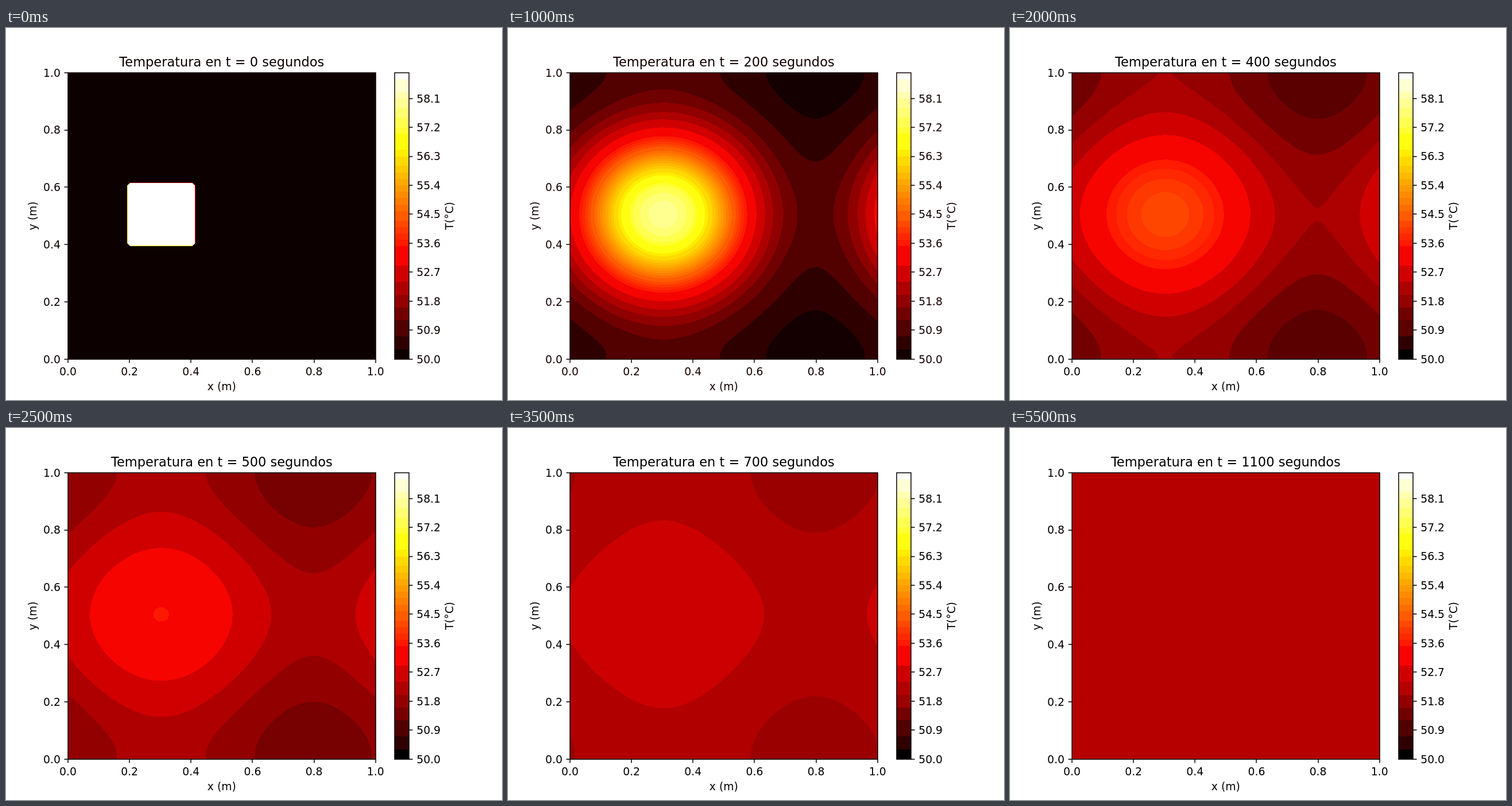
An HTML page with a canvas that plays this animation: 864x648 px, repeating every 6 s.

```html
<!DOCTYPE html>
<html lang="es">
<head>
<meta charset="utf-8">
<title>Temperatura</title>
<style>
html, body { margin: 0; width: 100%; height: 100%; overflow: hidden; background: #fff; }
canvas { display: block; }
</style>
</head>
<body>
<canvas id="stage" width="864" height="648"></canvas>
<script>
const ctx = document.getElementById("stage").getContext("2d");
const FONT = '"DejaVu Sans", Verdana, sans-serif';
const AX = { x: 108, y: 77.76, w: 535.68, h: 498.96 };
const BOTTOM = AX.y + AX.h;
const X0 = 108, X1 = 644, Y0 = 78, Y1 = 577, BAR0 = 677, BAR1 = 702;
const GRID = 99, PERIOD = 98, WIDTH = 21, BANDS = 89;
const MEAN = 2.29; // final rise above 50 degrees
const clamp = v => Math.max(0, Math.min(1, v));

// "hot" colour map, one colour per 0.1 degree, grouped into a coarse palette
const bands = Array.from({ length: BANDS }, (_, k) => {
  const v = Math.floor(256 * (k + 0.5) / BANDS) / 255;
  const rgb = [
    0.0416 + 0.9584 * clamp(v / 0.365079),
    clamp((v - 0.365079) / 0.380953),
    clamp((v - 0.746032) / 0.253968)
  ].map(c => Math.round(255 * c));
  const bin = (c, shift, offset) => Math.max(0, c - offset) >> shift;
  const key = bin(rgb[0], 5, 2) + "," + bin(rgb[1], 4, 2) + "," + bin(rgb[2], 5, 4);
  return { rgb, key };
});

// Each group takes the mean colour of the pixels that use it
function makePalette(counts) {
  const groups = {};
  const add = (key, rgb, n) => {
    const g = groups[key] ||= { n: 0, sum: [0, 0, 0] };
    g.n += n;
    rgb.forEach((c, i) => g.sum[i] += c * n);
  };
  bands.forEach((b, k) => add(b.key, b.rgb, counts[k] + 140));
  add(bands[0].key, [0, 0, 0], 5000);
  add(bands[BANDS - 1].key, [255, 255, 255], 250000);
  return bands.map(b => groups[b.key].sum.map(c => Math.round(c / groups[b.key].n)));
}

// Heat spread along one axis of a periodic plate, around grid point mid
function profile(g, mid, t) {
  if (!t) return clamp(WIDTH / 2 + 0.5 - Math.abs(g - mid));
  let u = 1;
  for (let n = 1; n < 10; n++) {
    const a = Math.PI * n / PERIOD;
    const amp = Math.sin(WIDTH * a) / (WIDTH * Math.sin(a));
    const rate = 2 - 2 * Math.cos(2 * a);
    u += 2 * amp * Math.exp(-rate * t) * Math.cos(2 * a * (g - mid));
  }
  return u;
}

function paintField(t) {
  const w = X1 - X0, h = Y1 - Y0;
  const ux = Array.from({ length: w }, (_, i) =>
    profile((X0 + i + 0.5 - AX.x) / AX.w * GRID, 30, t));
  const uy = Array.from({ length: h }, (_, j) =>
    profile((BOTTOM - Y0 - j - 0.5) / AX.h * GRID, 50, t));
  const counts = new Array(BANDS).fill(0);
  const cells = new Int16Array(w * h);
  for (let j = 0, p = 0; j < h; j++) {
    for (let i = 0; i < w; i++, p++) {
      const rise = t ? MEAN * ux[i] * uy[j] : 50 * Math.max(0, ux[i] + uy[j] - 1);
      const k = Math.max(0, Math.floor(rise * 10));
      cells[p] = k;
      if (k < BANDS) counts[k]++;
    }
  }
  const palette = makePalette(counts);
  const img = ctx.createImageData(w, h);
  cells.forEach((k, p) => {
    const c = palette[k] || [255, 255, 255];
    img.data.set([c[0], c[1], c[2], 255], p * 4);
  });
  ctx.putImageData(img, X0, Y0);
  return palette;
}

function paintBar(palette) {
  for (let y = Y0; y < Y1; y++) {
    const k = Math.floor((BOTTOM - y - 0.5) / AX.h * BANDS);
    ctx.fillStyle = `rgb(${palette[Math.max(0, Math.min(BANDS - 1, k))]})`;
    ctx.fillRect(BAR0, y, BAR1 - BAR0, 1);
  }
}

function text(str, x, y, align = "center", size = 18.75) {
  ctx.font = size + "px " + FONT;
  ctx.textAlign = align;
  ctx.fillText(str, x, y);
}

function upright(str, x, y) {
  ctx.save();
  ctx.translate(x, y);
  ctx.rotate(-Math.PI / 2);
  text(str, 0, 0);
  ctx.restore();
}

function line(x1, y1, x2, y2) {
  ctx.beginPath();
  ctx.moveTo(x1, y1);
  ctx.lineTo(x2, y2);
  ctx.stroke();
}

function paintAxes(t, ink) {
  const tick = 6.56;
  ctx.fillStyle = ctx.strokeStyle = ink;
  ctx.lineWidth = 1.5;
  ctx.strokeRect(X0, Y0, X1 - X0, Y1 - Y0);
  ctx.strokeRect(BAR0, Y0, BAR1 - BAR0, Y1 - Y0);
  for (let i = 0; i <= 5; i++) {
    const label = (i / 5).toFixed(1);
    const x = AX.x + AX.w * i / 5, y = BOTTOM - AX.h * i / 5;
    line(Math.round(x), Y1, Math.round(x), Y1 + tick);
    line(X0, Math.round(y), X0 - tick, Math.round(y));
    text(label, x, 605);
    text(label, 94.9, Math.round(y + 6.9), "right");
  }
  for (let i = 0; i < 10; i++) {
    const y = BOTTOM - AX.h * i * 9 / BANDS;
    line(BAR1, Math.round(y), BAR1 + tick, Math.round(y));
    text((50 + 0.9 * i).toFixed(1), 715.2, Math.round(y + 6.9), "left");
  }
  text("x (m)", AX.x + AX.w / 2, 630.5);
  upright("y (m)", 53, 327.2);
  upright("T(°C)", 778.5, 327.2);
  text(`Temperatura en t = ${t} segundos`, AX.x + AX.w / 2, 67, "center", 22.5);
}

let shown = -1;
function frame() {
  const step = Math.floor(performance.now() % 6000 / 500);
  if (step !== shown) {
    shown = step;
    ctx.fillStyle = "#fff";
    ctx.fillRect(0, 0, 864, 648);
    const palette = paintField(step * 100);
    paintBar(palette);
    paintAxes(step * 100, `rgb(${palette[0]})`);
  }
  requestAnimationFrame(frame);
}
frame();
</script>
</body>
</html>
```
